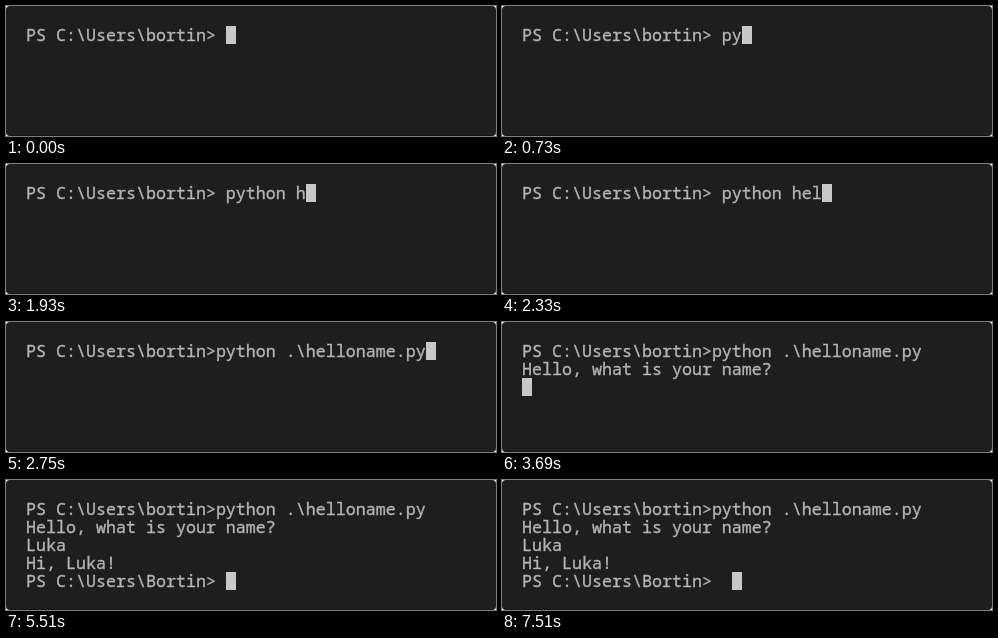
Write an HTML page that moves like this. It is 490 px wide and 130 px high and loops after 7.61 s.

```html
<!DOCTYPE html>
<html lang="en">
<head>
<meta charset="utf-8">
<title>Terminal session</title>
<style>
  html, body { margin: 0; width: 490px; height: 130px; overflow: hidden; background: #fff; }
  #terminal {
    position: relative; box-sizing: border-box; width: 490px; height: 130px;
    background: #1e1e1e; border-bottom: 1px solid #1e121a; border-radius: 4px; overflow: hidden;
  }
  #screen {
    position: absolute; left: 20px; top: 20px; margin: 0;
    font: 16.6667px/18px "Noto Sans Mono", "DejaVu Sans Mono", monospace;
    font-variant-ligatures: none; color: #b4b4b4; white-space: pre;
    -webkit-text-stroke: 0.35px #b4b4b4;
  }
  #cursor { position: absolute; left: 20px; top: 20px; width: 10px; height: 18px; background: #c8c8c8; }
</style>
</head>
<body>
<div id="terminal"><pre id="screen"></pre><div id="cursor"></div></div>
<script>
const LOOP = 7610, KEY = 200, CELL_W = 10, CELL_H = 18;
const screen = document.getElementById('screen');
const cursor = document.getElementById('cursor');

const prompt = 'PS C:\\Users\\bortin>';
const command = prompt + 'python .\\helloname.py';
const question = command + '\nHello, what is your name?\n';
const name = 'Luka';
const answered = question + name + '\n';
const greeted = answered + 'Hi, ' + name + '!\nPS C:\\Users\\Bortin> ';

// Each phase starts at `at`; `typed` is entered one key at a time from then on.
const phases = [
  { at: 0, text: prompt + ' ' },
  { at: 530, text: prompt + ' ', typed: 'python hell' },
  { at: 2730, text: command, hideCursor: true },
  { at: 2750, text: command },
  { at: 3640, text: command + '\n' },
  { at: 3690, text: question },
  { at: 4690, text: question, typed: name },
  { at: 5490, text: answered },
  { at: 5510, text: greeted },
  { at: 7510, text: greeted + ' ' }
];

let shown = null;

function draw(t) {
  const phase = phases.findLast(p => t >= p.at);
  const keys = Math.floor((t - phase.at) / KEY) + 1;
  const text = phase.text + (phase.typed || '').slice(0, keys);
  const state = text + !!phase.hideCursor;
  if (state === shown) return;
  shown = state;

  const lines = text.split('\n');
  const row = lines.length - 1;
  screen.textContent = text;
  cursor.hidden = !!phase.hideCursor;
  cursor.style.transform =
    `translate(${lines[row].length * CELL_W}px, ${row * CELL_H}px)`;
}

const start = performance.now();
function tick() {
  draw((performance.now() - start) % LOOP);
  requestAnimationFrame(tick);
}
tick();
</script>
</body>
</html>
```
